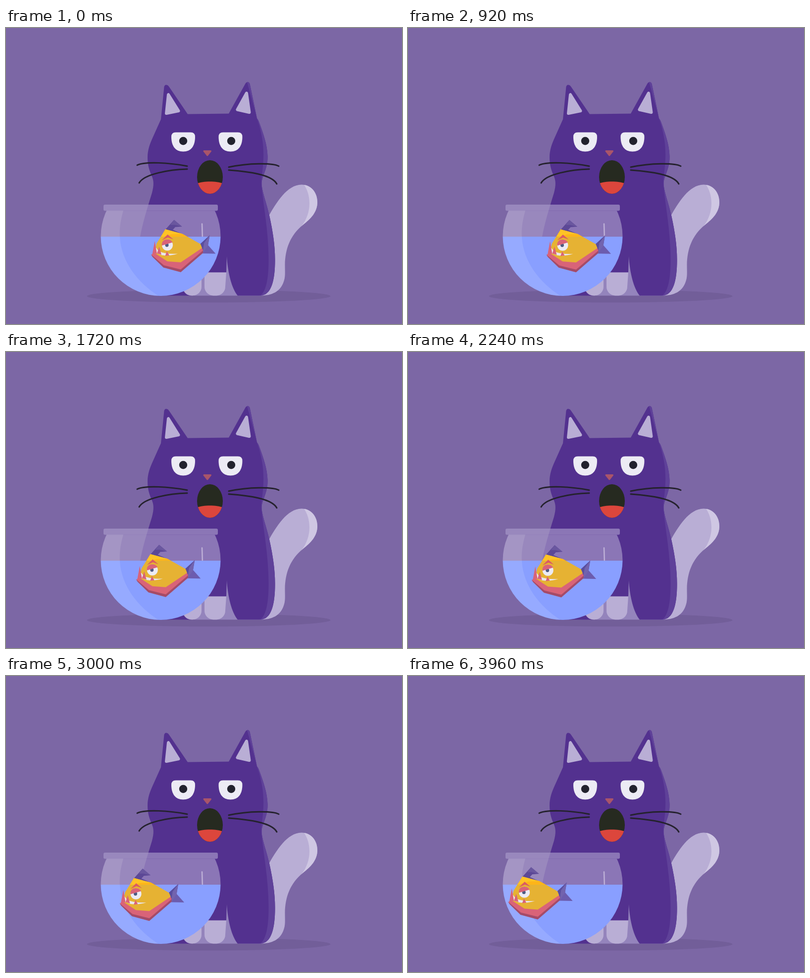
An HTML page with a canvas that plays this animation: 800x600 px, repeating every 4 s.

```html
<!DOCTYPE html>
<html lang="en">
<head>
<meta charset="utf-8">
<title>Cat and fish bowl</title>
<style>
html, body { margin: 0; width: 100%; height: 100%; overflow: hidden; background: #7c67a5; }
canvas { display: block; }
</style>
</head>
<body>
<canvas id="stage" width="800" height="600"></canvas>
<script>
const ctx = document.getElementById('stage').getContext('2d');
const LOOP = 4000, STEP = 40, KEY = 560, WATER = 423;
const PURPLE = '#53318f', LAVENDER = '#b9aed5', INK = '#25222e';
const BOWL = { x: 312.5, y: 422, r: 121 };

// Drift to the left and vertical bob, one value per KEY ms
const driftX = [0, -8, -17, -29.3, -43.3, -58, -73.6, -89.7, -106];
const bobY = [0, 0, .6, 1.8, 2.5, 1.9, .5, -1.5, -3];

function spline(keys, t) {
  const u = t / KEY, i = Math.min(Math.floor(u), keys.length - 2), f = u - i;
  const b = keys[i], c = keys[i + 1];
  const a = i > 0 ? keys[i - 1] : 2 * b - c;
  const d = i + 2 < keys.length ? keys[i + 2] : 2 * c - b;
  return b + f / 2 * (c - a + f * (2 * a - 5 * b + 4 * c - d + f * (3 * (b - c) + d - a)));
}

function shape(d, color) {
  ctx.fillStyle = color;
  ctx.fill(new Path2D(d));
}

function poly(color, ...pts) {
  shape('M' + pts.join(' ') + 'Z', color);
}

function softPoly(d, color, width) {
  ctx.lineJoin = 'round';
  ctx.lineWidth = width;
  ctx.strokeStyle = color;
  ctx.stroke(new Path2D(d));
  shape(d, color);
}

function line(d, color, width) {
  ctx.lineCap = 'round';
  ctx.lineWidth = width;
  ctx.strokeStyle = color;
  ctx.stroke(new Path2D(d));
}

function oval(x, y, rx, ry, color) {
  ctx.fillStyle = color;
  ctx.beginPath();
  ctx.ellipse(x, y, rx, ry, 0, 0, Math.PI * 2);
  ctx.fill();
}

function clipped(path, draw) {
  ctx.save();
  ctx.clip(path);
  draw();
  ctx.restore();
}

function box(x, y, w, h) {
  const p = new Path2D();
  p.rect(x, y, w, h);
  return p;
}

function drawTail() {
  const tail = new Path2D('M528 386C547 352 568 318 597 317.5C616 317.5 629 333 629 353' +
    'C629 374 615 387 600 399C574 420 564 448 563.5 480C563.5 496 565 505 560 517' +
    'C553 534 538 542.5 513 542.5L505 400Z');
  ctx.fillStyle = LAVENDER;
  ctx.fill(tail);
  clipped(tail, () => shape('M596 310C617 332 620 372 597 402L640 400V310Z', '#cfc7e3'));
}

function drawBody() {
  poly('#9484bc', 380, 542.5, 380, 500, 446, 460, 515, 542.5);
  const body = new Path2D('M313 185L319.5 119Q321 114 325 115.5Q327.500 116 329 118.500L367 174.500L450 173.500' +
    'L484 112Q486 109 489 109.500Q491.500 110 492.500 113L507 183Q510 187 511 190' +
    'C519 212 528 236 528.500 260C529 286 517 299 516.500 315C516.500 330 527 356 532 380' +
    'C539 412 543.500 440 543.500 470C543.500 512 536 542.500 513 542.500H468' +
    'C456 528 448 496 446 463L445 495.500H400L375 542.500H300L262 470L271 423' +
    'C277 391 287 360 295 334C299 319 299 309 294 299C289 287 286 277 286 262' +
    'C286 247 291 234 296 223Z');
  ctx.fillStyle = PURPLE;
  ctx.fill(body);
  clipped(body, () => shape('M486 106L508 186C517 212 521 238 520 265C519 290 515 306 516 318' +
    'C520 360 530 410 530.500 465C531 505 526 535 513 543H560V100Z', '#5f4199'));
  // Paws
  shape('M357 505H395V524A18 18 0 0 1 377 542.500H374A18 18 0 0 1 357 526Z', LAVENDER);
  shape('M401 495.500H445L443 524A18 18 0 0 1 425 542.500H419A18 18 0 0 1 401 524Z', LAVENDER);
}

function drawFace() {
  softPoly('M328 135L324 173L348.500 168Z', LAVENDER, 6);
  softPoly('M486 132L467.500 165.500L491.500 171Z', LAVENDER, 6);

  for (const [x, pupil] of [[358, 358], [453.5, 455]]) {
    ctx.save();
    ctx.translate(x, 0);
    shape('M-15 211.500H15Q24 211.500 24 220.500C24 239 16 250.500 0 250.500' +
      'C-16 250.500 -24 239 -24 220.500Q-24 211.500 -15 211.500Z', '#ecebf4');
    ctx.restore();
    oval(pupil, 229, 8.2, 8.2, '#22222e');
  }
  softPoly('M400 249.500H413.500L406.800 258Z', '#a9556a', 3);

  const mouth = new Path2D();
  mouth.ellipse(412, 302, 26, 34, 0, 0, Math.PI * 2);
  ctx.fillStyle = '#262a20';
  ctx.fill(mouth);
  clipped(mouth, () => shape('M384 316C396 309.500 428 309.500 440 316V340H384Z', '#dc463c'));

  line('M265 278C281 270 330 273 366 280', INK, 3);
  line('M269 314C279 296 330 287 366 286', INK, 3);
  line('M450 282C490 273.500 539 273 551 280', INK, 3);
  line('M450 288C490 291 537 297 547 316', INK, 3);
}

function drawBowl() {
  const glass = new Path2D();
  glass.arc(BOWL.x, BOWL.y, BOWL.r, 0, Math.PI * 2);
  const shine = 'M237 370C231 392 229 407 230 424C233 474 266 516 308 543H180V370Z';
  const tint = 'rgba(168,153,201,.67)';
  ctx.fillStyle = tint;
  ctx.beginPath();
  ctx.roundRect(197, 358, 231, 12.5, 3);
  ctx.fill();
  clipped(glass, () => {
    ctx.fillStyle = tint;
    ctx.fillRect(190, 370.5, 246, WATER - 370.5);
    ctx.fillStyle = '#899fff';
    ctx.fillRect(190, WATER, 246, 122);
    shape(shine, 'rgba(255,255,255,.11)');
  });
  line('M396 397L396.800 422', '#bcaed6', 2.6);
}

function drawFish(yellow, crest) {
  // Tail fin
  poly('#594d9e', 411.5, 420, 391, 439, 397, 457, 408, 441);
  poly('#6c5cae', 397, 457, 423.5, 457.5, 408, 440);
  poly('#7263ae', 411.5, 420, 400, 436, 397, 457, 408, 441);

  // Back fin
  poly('#5c4896', 339.5, 389, 322, 408.5, 357, 418, 337, 409, 342, 403.5, 355.5, 402.5);
  poly('#6a579f', 339.5, 389, 355.5, 402.5, 341, 399, 332, 399);

  // Jaw and body
  poly('#a54b68', 293, 459, 296, 464, 318, 485.5, 353, 495, 398, 456, 398, 448, 353, 486);
  poly('#d96378', 294, 460, 299, 452, 350, 466, 394, 441, 398, 451, 353, 489.5, 319, 481);
  poly(yellow, 322, 408, 357, 417.5, 393, 438, 396, 446, 353, 475, 326, 473, 300, 456, 304, 437);
  poly(crest, 322, 408, 357, 417.5, 334, 418, 312, 425);

  // Grin and teeth
  shape('M303 445L308 452Q322 459 347 457.500Q329 463 315 460.500L303 456Z', '#e9e6ee');
  poly('#d96378', 300.5, 432, 296, 456, 305, 457.5);
  poly('#d96378', 309.5, 443, 305, 457, 314, 459.5);
  poly('#d96378', 325, 452.5, 321.5, 462, 330, 461);

  // Eye
  oval(326, 440, 11, 11.2, '#ecebf4');
  oval(325, 440, 3.5, 3.7, '#4d5b82');
  shape('M314.800 441C314 431 321 428.500 326 428.500Q333 428.500 336.500 434.500Z', '#d96378');
  poly('#db5b63', 315, 430, 326.500, 418.500, 338, 428.500, 327, 424.5);
}

function render(now) {
  const t = Math.floor(now % LOOP / STEP) * STEP;
  ctx.fillStyle = '#7c67a5';
  ctx.fillRect(0, 0, 800, 600);
  oval(409.5, 543.5, 246, 13, '#725e99');
  drawTail();
  drawBody();
  drawFace();
  drawBowl();

  const swim = (yellow, crest) => () => {
    ctx.translate(spline(driftX, t), spline(bobY, t));
    drawFish(yellow, crest);
  };
  clipped(box(0, 0, 800, WATER), swim('#fdb519', '#ffc326'));
  clipped(box(0, WATER, 800, 600 - WATER), swim('#e6b233', '#e6b233'));
}

const start = performance.now();
function tick() {
  render(performance.now() - start);
  requestAnimationFrame(tick);
}
tick();
</script>
</body>
</html>
```
